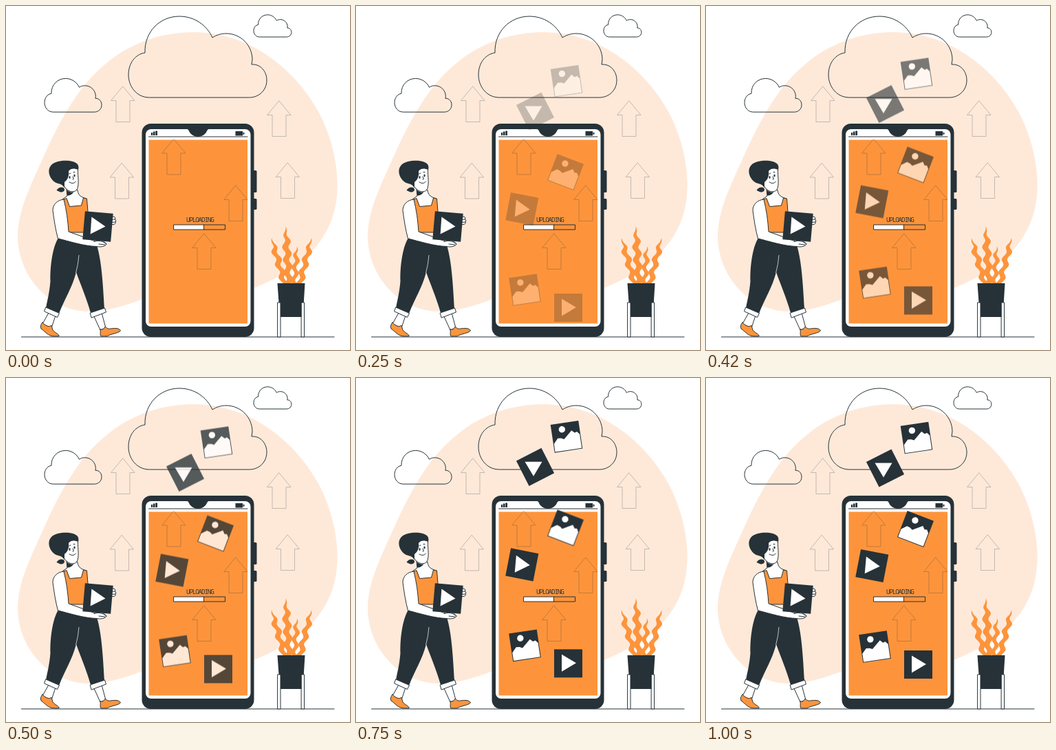
Animation, 500 px wide and 500 px high, one loop 1040 ms. Source, as an HTML page:

```html
<!DOCTYPE html>
<html lang="en">
<head>
<meta charset="utf-8">
<title>Uploading</title>
<style>
  html, body { margin: 0; width: 100%; height: 100%; overflow: hidden; background: #fff; }
  svg { display: block; width: 100vw; height: 100vh; }
  .dark { fill: #263238; }
  .orange { fill: #fd943c; }
  .white { fill: #fff; }
  .line { fill: none; }
  .line, .edge { stroke: #263238; stroke-width: 1; stroke-linejoin: round; stroke-linecap: round; }
  .cloud { vector-effect: non-scaling-stroke; }
  .arrow { stroke-width: .9; stroke-linejoin: miter; }
  text { font: 500 9.4px "Noto Sans Mono", "Liberation Mono", monospace; letter-spacing: -.13em; }
</style>
</head>
<body>
<svg viewBox="0 0 500 500">
  <defs>
    <path id="cloud" class="line cloud" d="M208 133C190 133 178 117 178 100C178 83 188 70 202 68C201 37 224 15 252 15C274 15 292 28 300 46C306 42 313 40 320 40C341 40 358 57 358 78L357 85C370 84 379 95 379 108C379 122 368 133 354 133Z"/>
    <path id="arrow" class="line arrow" d="M0 0L17 20.5H10V51.5H-10V20.5H-17Z"/>
    <path id="play" class="white" d="M-7-12.5V12.5L14 0Z"/>
    <g id="photo">
      <rect class="dark" x="-20.5" y="-20.5" width="41" height="41"/>
      <circle class="white" cx="-5" cy="-11.5" r="4.7"/>
      <path class="white" d="M-19.5 7.5L-13 .5L-8 1L-4 3L8.5-8L12.500-4L16-5L19.500-1V19.500H-19.500Z"/>
    </g>
  </defs>

  <path fill="#fee9d9" d="M272 38C360 38 424 98 455 155C478 200 484 245 481 275C476 335 436 380 360 410L198 426C170 437 145 444 118 444C60 442 17 390 17 334C18 295 35 263 55 218C82 158 108 114 145 84C182 52 230 38 272 38Z"/>
  <use href="#cloud"/>
  <use href="#cloud" transform="translate(-17.5 99.2) scale(.413)"/>
  <use href="#cloud" transform="translate(311.4 8.7) scale(.273)"/>
  <path class="line" d="M22.5 481H477"/>

  <!-- phone -->
  <rect class="dark" x="197.500" y="171" width="163" height="310" rx="13"/>
  <rect class="dark" x="358" y="239" width="6.500" height="32" rx="1.500"/>
  <rect class="dark" x="358" y="280" width="6.500" height="16" rx="1.500"/>
  <rect class="white" x="203" y="179" width="152.500" height="287" rx="8"/>
  <path class="dark" d="M262 178.500C266 179 266 183 268 185C271 188.500 275 190 279 190C283 190 287 188.500 290 185C292 183 292 179 296 178.500Z"/>
  <path class="line" d="M207.500 190H351"/>
  <rect class="orange" x="207.500" y="194.500" width="143.500" height="267"/>
  <path class="dark" d="M211 184H213.300V188H211ZM214 182.500H216.500V188H214ZM217.300 181.500H220V188H217.300ZM333.500 182H344V188.500H333.500ZM344.500 183.500L346.500 184V186.500L344.500 187Z"/>
  <text class="dark" x="262" y="313.700">UPLOADING</text>
  <rect class="white" x="244" y="318" width="43.500" height="7"/>
  <path class="line" d="M244 318H318.500V325H244ZM287.500 318V325"/>
  <g id="arrows" opacity=".3"></g>

  <!-- plant -->
  <g id="leaves" class="orange"></g>
  <path class="dark" d="M394.500 403H434.500L431.500 452H398Z"/>
  <path class="white edge" d="M395 431H399V481H395ZM429.500 431H433.500V481H429.500Z"/>

  <!-- legs -->
  <path class="white edge" d="M62 446L53 462L66 468L72 450ZM127 449L137 471L145 468L139 446Z"/>
  <path class="orange edge" d="M53 460C50 463 50 467 51 469C57 473 61 480 70 480H77C78 477 72 476 68 471L66 464C64 467 58 466 53 460Z"/>
  <path class="orange edge" d="M137 470C138 474 136 478 138 480H147C153 476 163 476 166.500 472C165 468 158 468 152 469C147 470 146 467 144 466C143 469 140 471 137 470Z"/>
  <path class="dark" d="M76 337C67 352 64 380 64.500 400C63 418 60 428 58 439L77 447C85 426 96 410 102 387C108 404 117 424 123 446L143 440C141 405 139 370 132 348Z"/>
  <path fill="none" stroke="#fff" stroke-width=".7" d="M106 362Q105 376 101.500 388"/>
  <path class="white edge" d="M58 438L77.500 446.500L74.500 452.500L56 444ZM122.500 446L143.500 439L145.500 445L124.500 453Z"/>

  <!-- head and body -->
  <path class="white edge" d="M88 266L89 276L82 281L92 300H116L117 280C110 278 105 276 104 268Z"/>
  <path class="white edge" d="M90 238C96 234 103 234 104.500 238C104 247 107 260 103 267C99 272 90 270 86 264L80 257Z"/>
  <path class="dark" d="M88 267C91 270 95 271 98.500 270.500C96 274 92 276 89 275.500Z"/>
  <path class="dark" d="M85 264C82 260 80 259 76 258C71 257 68 254 66 251C61 244 61 235 67 230C76 223 98 223 104 230C106 233 105.500 236 105 238C99 235.500 94 236 91 240C92 248 89 253 85 256Z"/>
  <path class="dark" d="M73.500 268C75 264 81 262 84 264.500C87 268 83 271 79 270.500Z"/>
  <ellipse class="dark" cx="92.500" cy="249" rx="1.100" ry="1.900"/>
  <ellipse class="dark" cx="99.500" cy="246.500" rx="1.100" ry="1.900"/>
  <path class="line" d="M92 244L94 243M98 241.500L100 241.500M97 248L98.500 251.500L97 252M92 256Q98 260 101.500 255"/>
  <path class="orange edge" d="M84 281L88 279.500L92.500 291.500L109.500 290L112.500 279L117.500 280L119 299L115 329H90Z"/>
  <path class="white edge" d="M84 281C74 282 68 289 68 297C70 312 72 325 75.500 338C92 342 113 349 132 349.500C138 351 145 349 146 346C143 341 136 341 130 342L91 328C90 312 88 297 84 281Z"/>
  <path class="white edge" d="M152 307L157 306Q160 308 158.500 310Q161 312 159 314Q160 317 156 317.500L151 318Z"/>
  <path class="line" d="M153 310.500L158.500 310M153 314.500L159 314"/>
  <rect class="dark" x="-20.500" y="-20.500" width="41" height="41" transform="translate(133.500 320.500) rotate(5)"/>
  <use href="#play" transform="translate(130.500 319.500) rotate(4)"/>
  <path class="white" d="M126 346L129 342C134 341 139 341 142 343L138 347Z"/>
  <path class="line" d="M128 342.500C134 340.500 140 341 146 346M135 346L144 347"/>

  <g id="tiles"></g>
</svg>
<script>
const LOOP = 1040, FPS = 24, RISE = 30;
const byId = id => document.getElementById(id);
const use = (id, x, y, angle = 0) =>
  `<use href="#${id}" transform="translate(${x} ${y}) rotate(${angle})"/>`;

byId('arrows').innerHTML = [[170, 117], [397, 138], [168.5, 228.5], [409.5, 228],
  [244, 193.5], [334, 261], [288, 331]].map(p => use('arrow', ...p)).join('');

// A tapering ribbon that waves from its tip down to the pot.
function leaf(tipX, tipY, baseX, width, sway) {
  const left = [], right = [], baseY = 404;
  for (let i = 0; i <= 40; i++) {
    const u = i / 40, y = tipY + (baseY - tipY) * u;
    const wave = sway * Math.min(1, u * 5) * Math.sin((y - tipY) / 2.95 - 2.5);
    const x = tipX + (baseX - tipX) * u + wave;
    const half = width / 2 * Math.min(1, u * 3.5);
    left.push(`${x - half} ${y}`);
    right.unshift(`${x + half} ${y}`);
  }
  return `<path d="M${left.concat(right).join('L')}Z"/>`;
}
byId('leaves').innerHTML = leaf(386, 337, 405, 8, 2.3) + leaf(406.5, 320, 411, 9, -2.3) +
  leaf(423, 349, 419, 6.5, -2.3) + leaf(444, 337, 427, 8, -2.3);

const video = (x, y, angle, playAngle) =>
  `<rect class="dark" x="-20.5" y="-20.5" width="41" height="41" transform="translate(${x} ${y}) rotate(${angle})"/>` +
  use('play', x - 2.5, y - .5, playAngle);

const tiles = byId('tiles');
tiles.innerHTML = video(308.5, 416.5, 0, 0) + video(241.3, 273, 11, 5) + video(260.5, 131, -27, 90) +
  use('photo', 306, 87, -8.5) + use('photo', 245.5, 390.5, -8.5) + use('photo', 304.5, 219.5, 21);

// Cubic Bezier easing with a soft overshoot.
function ease(x) {
  const curve = (s, a, b) => 3 * (1 - s) ** 2 * s * a + 3 * (1 - s) * s * s * b + s ** 3;
  let low = 0, high = 1;
  for (let i = 0; i < 30; i++) {
    const mid = (low + high) / 2;
    if (curve(mid, .36, .5) < x) low = mid; else high = mid;
  }
  return curve(high, -.01, 1.38);
}

// Motion advances in 24 steps a second, each showing the middle of its interval.
function draw(ms) {
  const t = ms % LOOP;
  let step = FPS;
  while (Math.round(step * 100 / FPS) * 10 > t) step--;
  const progress = step < 3 ? 0 : ease(Math.min(1, (step + .5) / FPS));
  tiles.setAttribute('transform', `translate(0 ${RISE * (1 - progress)})`);
  tiles.setAttribute('opacity', Math.max(0, Math.min(1, progress)));
}

const start = performance.now();
function tick() {
  draw(performance.now() - start);
  requestAnimationFrame(tick);
}
tick();
</script>
</body>
</html>
```
